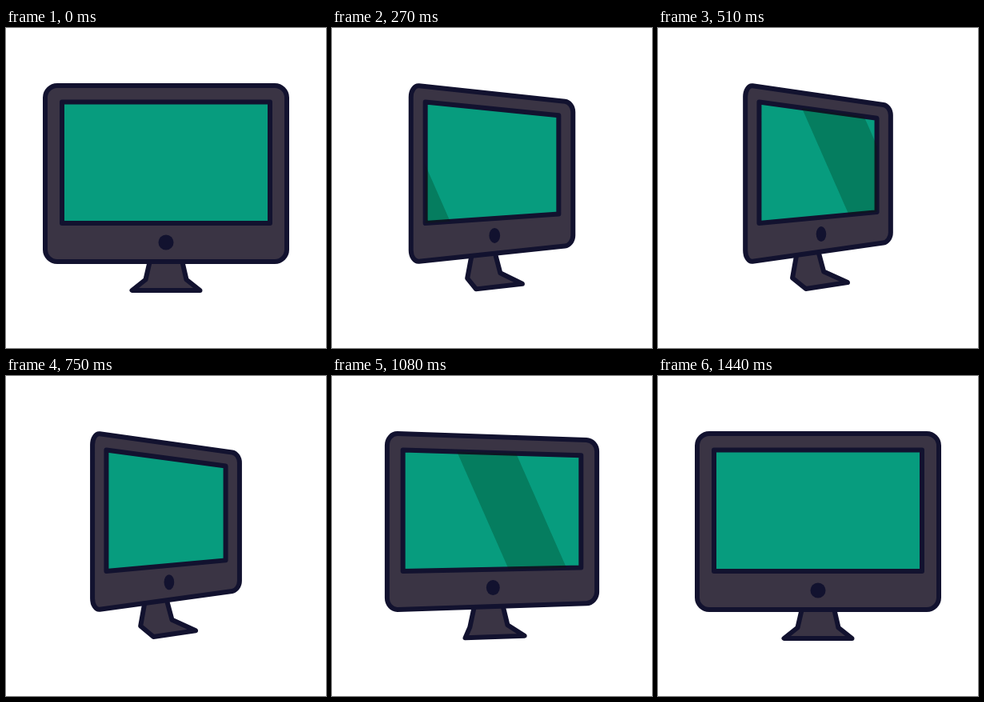
These frames come from a looping animation (400 by 400 pixels, 3.62 s). An HTML page with a canvas:

```html
<!DOCTYPE html>
<html lang="en">
<head>
<meta charset="utf-8">
<title>Turning monitor</title>
<style>
  html, body { margin: 0; width: 100%; height: 100%; overflow: hidden; background: #fff; }
  canvas { display: block; width: 100vmin; height: 100vmin; }
</style>
</head>
<body>
<canvas id="stage"></canvas>
<script>
const LOOP = 3620, STEP = 30, TURN = 600, SWEEP = 870, MID = 200;
const INK = '#12122f', CASE = '#3a3444', SCREEN = '#079c7e', SHADE = 'rgba(0,32,0,.25)';

const canvas = document.getElementById('stage');
const ctx = canvas.getContext('2d');

const clamp = v => Math.min(1, Math.max(0, v));
const smooth = v => v * v * (3 - 2 * v);
const mix = (a, b, k) => a.map((v, i) => v + (b[i] - v) * k);

// cubic-bezier(.31, 0, .03, 1)
function turnEase(x) {
  let lo = 0, hi = 1;
  for (let i = 0; i < 24; i++) {
    const s = (lo + hi) / 2, r = 1 - s;
    if (.93 * s * r * r + .09 * s * s * r + s * s * s < x) lo = s; else hi = s;
  }
  return smooth(lo);
}

// A box turned by k: it narrows, its near (left) edge grows, its far edge shrinks.
function panel(k, { half, top, bottom, squeeze, near, drop, rise }) {
  const w = half * (1 - squeeze * k);
  return [
    [MID - w, top - near * k], [MID + w, top + drop * k],
    [MID + w, bottom - rise * k], [MID - w, bottom + near * k]
  ];
}

// One level of the stand: s is -1 for its left end, 1 for its right end.
const standPoint = (k, s, half, y, drift, squeeze) =>
  [MID + drift * k + s * half * (1 - squeeze * k), y - (6 + 4 * s) * k];

function standOutline(k) {
  const side = s => [
    standPoint(k, s, 18, 282, -14, .32),
    standPoint(k, s, 25.5, 314.5, -12.5, .235),
    standPoint(k, s, 42.5, 328, 11, .39)
  ];
  return [...side(-1), ...side(1).reverse()];
}

function polygon(points) {
  const path = new Path2D();
  points.forEach(p => path.lineTo(...p));
  path.closePath();
  return path;
}

// Rounds a quad by a share of each edge, so the corners turn with it.
function rounded(quad, across, down) {
  const path = new Path2D();
  quad.forEach((c, i) => {
    const [before, after] = i % 2 ? [across, down] : [down, across];
    const from = mix(c, quad[(i + 3) % 4], before);
    const to = mix(c, quad[(i + 1) % 4], after);
    path.lineTo(...from);
    path.bezierCurveTo(...mix(from, c, .55), ...mix(to, c, .55), ...to);
  });
  path.closePath();
  return path;
}

function paint(path, fill) {
  ctx.fillStyle = fill;
  ctx.fill(path);
  ctx.stroke(path);
}

function glare(time) {
  if (time <= 0 || time >= SWEEP) return;
  const x = 19 + 420 * smooth(time / SWEEP);
  const edge = y => x + (y - 168) * .44;
  ctx.fillStyle = SHADE;
  ctx.fill(polygon([[edge(80) - 73, 80], [edge(80), 80], [edge(256), 256], [edge(256) - 73, 256]]));
}

function draw(t) {
  const k = turnEase(clamp(1 - Math.abs(t - TURN) / TURN));
  ctx.fillStyle = '#fff';
  ctx.fillRect(0, 0, 400, 400);
  ctx.strokeStyle = INK;
  ctx.lineJoin = 'round';
  ctx.lineWidth = 6;

  paint(polygon(standOutline(k)), CASE);

  const body = panel(k, { half: 151, top: 72, bottom: 292, squeeze: .402, near: 1, drop: 25.5, rise: 25 });
  paint(rounded(body, .05, .068), CASE);

  ctx.fillStyle = INK;
  ctx.beginPath();
  ctx.ellipse(MID + 4 * k, 268 - 10.5 * k, 9.5 * (1 - .34 * k), 9.5, 0, 0, 2 * Math.PI);
  ctx.fill();

  const screen = panel(k, { half: 130, top: 92.5, bottom: 244, squeeze: .438, near: 0, drop: 20.5, rise: 14 });
  const glass = polygon(screen);
  paint(glass, SCREEN);
  ctx.save();
  ctx.clip(glass);
  glare(t);
  glare(t - TURN);
  ctx.restore();
}

function resize() {
  const size = Math.min(innerWidth, innerHeight) * devicePixelRatio;
  canvas.width = canvas.height = Math.round(size);
  ctx.setTransform(size / 400, 0, 0, size / 400, 0, 0);
}

const start = performance.now();
function frame() {
  const t = (performance.now() - start) % LOOP;
  draw(Math.floor(t / STEP) * STEP);
  requestAnimationFrame(frame);
}

addEventListener('resize', resize);
resize();
frame();
</script>
</body>
</html>
```
